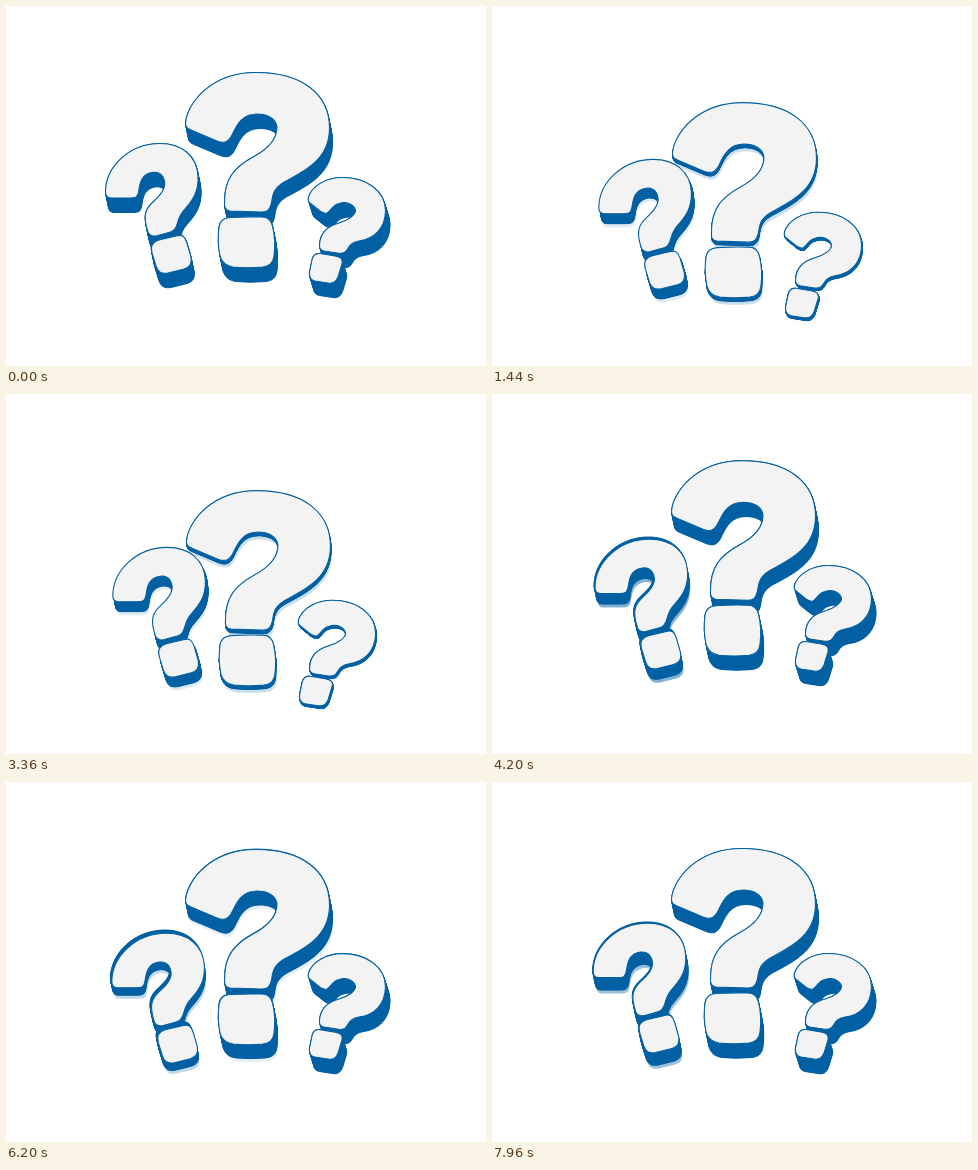
These frames come from a looping animation (480 by 360 pixels, 8000 ms). An HTML page with a canvas:

```html
<!DOCTYPE html>
<html lang="en">
<head>
<meta charset="utf-8">
<title>Floating question marks</title>
<style>
  html, body { margin: 0; height: 100%; overflow: hidden; background: #fff; }
  canvas { display: block; }
</style>
</head>
<body>
<canvas id="stage" width="480" height="360"></canvas>
<script>
const ctx = document.getElementById('stage').getContext('2d');
const BLUE = '#0260a3', FACE = '#f3f3f3';
const LOOP = 8000, HALF = 960;

// Paths show the raised pose; travel and depths are [x, y] offsets.
const marks = [
  {
    delay: 255, travel: [1, 32], depth: [3, 14.5], pressed: [0.5, 2.5],
    path: new Path2D(`M179.5 117 C181 98 204 66.5 250 66.5 C296 66.5 323.5 88 323.5 122
      C323.5 151 303 163 282 174 C261 184 269 195 263 203 Q261 206 256 206
      L224 205 Q218 204 218.5 198 C218 172 229 161 247 151 C264 142 271 132 271 121
      C270 112 261 108 251 108 C236 108 231 119 227 127 C223 136 219 138 211 135
      L185 124 Q179 122 179.5 117 Z
      M224 211.5 Q239 210.5 256 211 C262 211 265 214 266.5 220 Q270 234 268 250
      C267 257 264 260 257 261 Q241 262.5 227 261 C220 260 216 257 214 250
      Q211 236 213 221 C214 215 217 212 224 211.5 Z`)
  },
  {
    delay: 0, travel: [15.5, 33.5], depth: [3, 14.5], pressed: [0, 1],
    path: new Path2D(`M99.5 186 C99.5 161 123 137.5 154 137.5 C176 137.5 191 150 192 170
      C193 186 186 195 178 204 C170 213 173 219 168 224 Q166 226 161 227
      L150 230 Q144 231 142 226 C136 208 140 202 149 194 C159 185 161 178 157 171
      C153 164 141 165 136 173 C132 180 134 188 130 191 Q128 192 124 192
      L105 192 Q99.5 192 99.5 186 Z
      M153 234 L170 230 C177 228 179 231 181 237 L185 251 C186 258 184 261 178 263
      L162 267 C155 268 152 266 150 260 L146 247 C144 240 146 236 153 234 Z`)
  },
  {
    delay: 365, travel: [-10, 35], depth: [4.5, 14.5], pressed: [1, 2.5],
    path: new Path2D(`M302.5 191 C306 180 320 171.5 336 171.5 C361 171.5 379.5 185 379.5 205
      C379 223 368 233 353 235 C342 237 343 243 339 246 Q336 248 331 247
      L318 245 Q313 244 313.5 239 C314 226 322 220 333 217 C343 214 349 209 349.5 205
      C349 198 340 195 333 197.5 C326 199 325 205 321 207 Q318 208 314 205
      L304 197 Q301.5 195 302.5 191 Z
      M314 247.5 L329 250 C335 251 337 253 336 258 L332 271 C330 276 327 278 322 277
      L309 275 C304 274 303 271 303.5 266 L306 254 C307 249 309 247 314 247.5 Z`)
  }
];

const easeInOut = u => u < .5 ? 4 * u ** 3 : 1 - 4 * (1 - u) ** 3;

// 0 = raised, 1 = pressed; each mark waits raised until its delay has passed.
function press(time) {
  const u = Math.max(0, time) / HALF % 2;
  return easeInOut(u < 1 ? u : 2 - u);
}

function drawAt(path, x, y, color, lineWidth, alpha = 1) {
  ctx.save();
  ctx.translate(x, y);
  ctx.globalAlpha = alpha;
  ctx.fillStyle = color;
  ctx.strokeStyle = BLUE;
  ctx.lineWidth = lineWidth;
  ctx.lineJoin = 'round';
  ctx.fill(path);
  if (lineWidth) ctx.stroke(path);
  ctx.restore();
}

function drawMark({ delay, travel, depth, pressed, path }, time) {
  const s = time - delay;
  const at = lag => travel.map(d => d * press(s - lag));
  const face = at(-8);
  const rim = at(30);
  const sink = press(s - 20);
  const back = depth.map((d, i) => d + (travel[i] + pressed[i] - d) * sink);

  // The soft shadow shows only during the first half of each move.
  const moving = s > 0 ? s % HALF : 0;
  const shade = .5 * Math.exp(-(((moving - 340) / 120) ** 2));
  if (shade > .01) drawAt(path, back[0] + 1, back[1] + 3.5, BLUE, 0, shade);

  const steps = 20;
  for (let i = steps; i >= 0; i--) {
    const k = i / steps;
    drawAt(path, rim[0] + (back[0] - rim[0]) * k, rim[1] + (back[1] - rim[1]) * k, BLUE, 1);
  }
  drawAt(path, face[0], face[1], FACE, 1.1);
}

function render(now) {
  const time = now % LOOP;
  ctx.fillStyle = '#fff';
  ctx.fillRect(0, 0, 480, 360);
  marks.forEach(mark => drawMark(mark, time));
}

const start = performance.now();
function frame() {
  render(performance.now() - start);
  requestAnimationFrame(frame);
}
frame();
</script>
</body>
</html>
```
